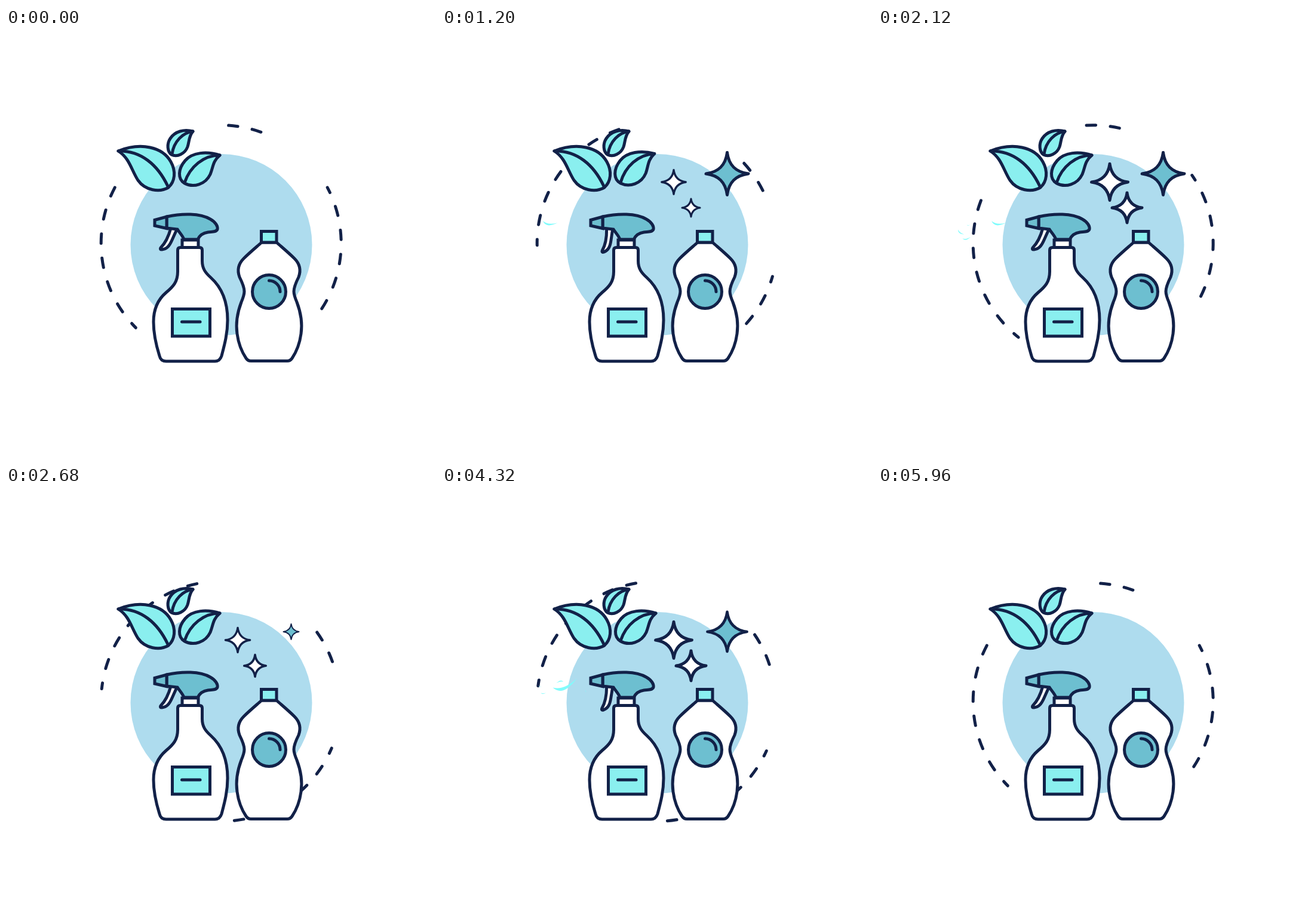
An HTML page with a canvas for the animation above (6 s loop, 720 by 720 pixels).

```html
<!DOCTYPE html>
<html lang="en">
<head>
<meta charset="utf-8">
<title>Eco cleaning</title>
<style>
html, body { margin: 0; width: 100%; height: 100%; overflow: hidden; background: #fff; }
canvas { display: block; }
</style>
</head>
<body>
<canvas id="stage" width="720" height="720"></canvas>
<script>
const ctx = document.getElementById('stage').getContext('2d');
const LOOP = 6000, STEP = 40, RAD = Math.PI / 180;
const NAVY = '#122148', TEAL = '#6dbfd0', AQUA = '#8aefef', SKY = '#aedcee', MIST = '#80fcfc';

const smooth = s => s * s * (3 - 2 * s);

// keys: [seconds, value] pairs, eased in and out between neighbours
function track(t, keys) {
  if (t <= keys[0][0]) return keys[0][1];
  for (let i = 1; i < keys.length; i++) {
    const [t0, a] = keys[i - 1], [t1, b] = keys[i];
    if (t < t1) return a + (b - a) * smooth((t - t0) / (t1 - t0));
  }
  return keys[keys.length - 1][1];
}

const bump = (t, from, to, v) => track(t, [[from, 0], [(from + to) / 2, v], [to, 0]]);

function shape(d, fill, stroke = true) {
  const p = typeof d === 'string' ? new Path2D(d) : d;
  if (fill) { ctx.fillStyle = fill; ctx.fill(p); }
  if (stroke) { ctx.strokeStyle = NAVY; ctx.lineWidth = 5; ctx.stroke(p); }
}

function turned(x, y, deg, draw) {
  ctx.save();
  ctx.translate(x, y);
  ctx.rotate(deg * RAD);
  ctx.translate(-x, -y);
  draw();
  ctx.restore();
}

function disc(x, y, r, fill, stroke) {
  const p = new Path2D();
  p.arc(x, y, r, 0, 7);
  shape(p, fill, stroke);
}

// ---- dashed ring ----
const RING = [[0, 0], [1, 50], [2, -10], [3, 70], [4, 40], [5, 90], [5.96, 0]];
const ARCS = [[-28.4, 33.7, 201], [134.6, 208.4, 201], [-87.4, -69.6, 197.8]];

function ring(t) {
  const turn = track(t, RING), cap = 0.7;
  for (const [from, to, r] of ARCS) {
    for (let a = to; a > from + 2; a -= 11.6) {
      const p = new Path2D();
      p.arc(360.2, 360.5, r, (Math.max(a - 5.9, from) + cap + turn) * RAD, (a - cap + turn) * RAD);
      shape(p);
    }
  }
}

// ---- leaves ----
function leaves(t) {
  turned(272, 265, bump(t, 3, 4, -4.8), () => {
    shape('M188 206C226 191 262 199 276 224C285 240 283 257 272 267C257 276 233 272 221 255C210 238 207 218 188 206Z', AQUA);
    shape('M188 206C226 205 254 229 271 265');
  });
  turned(300, 261, bump(t, 1, 2, -7.4), () => {
    shape('M358 213C336 206 312 208 300 222C288 236 287 253 299 260C314 268 334 262 342 245C347 233 346 223 358 213Z', AQUA);
    shape('M358 213C331 213 308 232 299 259');
  });
  turned(277, 211, bump(t, 4.5, 5.5, 8.6), () => {
    shape('M313 173C298 169 283 173 275 185C269 194 270 207 277 212C287 217 300 210 304 199C307 190 306 181 313 173Z', AQUA);
    shape('M313 173C296 175 281 190 278 211');
  });
}

// ---- bottles ----
const PULL = [[0.75, 0], [1.15, -16], [2, 0], [3.9, 0], [4.4, -16], [5, -16], [5.5, 0]];

function sprayer(t) {
  turned(281, 337, track(t, PULL), () =>
    shape('M276 335C272 350 267 360 259 368Q257 371 261 371C270 370 274 364 278 355L287 335Z', '#fff'));
  shape('M295 355H322V368H295Z', '#fff');
  shape('M269 316C295 310 325 310 342 320C351 325 355 332 354 337C352 342 345 341 338 342C330 343 324 348 321 354H298C296 348 290 342 287 337L269 335Z', TEAL);
  shape('M249 321.5L269 316V335.5L249 331Z', TEAL);
  shape('M287.5 372Q287.5 367.5 292 367.5H324Q328.500 367.500 328.500 372V390C328.500 403 334 410 343 418C364 437 371 462 371 489C371 512 366 530 361 549Q358 558 350 558H268Q259 558 257 549C251 530 247 512 247 492C247 470 254 455 268 443C280 433 287.500 425 287.500 408Z', '#fff');
  shape('M278.500 470.500H341.500V516H278.500Z', AQUA);
  shape('M294.500 492H325');
}

function bottle() {
  shape('M428 359C419 367 408 376 398 386C389 395 387 406 391 417C395 425 399 433 399 441C399 447 397 452 394 459C386 480 385 498 387 512C389 527 394 541 402 553Q405 557.500 410 557.500H471Q476 557.500 479 553C487 541 492 527 494 512C496 498 495 480 487 459C484 452 482 447 482 441C482 433 486 425 490 417C494 406 492 395 483 386C473 376 462 367 453 359Z', '#fff');
  shape('M427.500 340.500H453V359H427.500Z', AQUA);
  disc(440.5, 441.5, 28, TEAL, true);
  shape('M440.500 423A18.500 18.500 0 0 1 459 441.500');
}

// ---- sparkles ----
const STARS = [
  { x: 477.5, y: 244, r: 35.5, fill: TEAL, ends: [0, 1, 2.09, 3.09, 3.42, 4.1, 4.2, 4.95] },
  { x: 388, y: 258, r: 30.5, fill: '#fff', ends: [0.65, 1.55, 2.3, 3.3, 3.45, 4.35, 4.6, 5.6] },
  { x: 417, y: 301, r: 25, fill: '#fff', ends: [0.7, 1.58, 2.34, 3.34, 3.37, 4.3, 4.68, 5.68] }
];

function star(t, { x, y, r, fill, ends }) {
  const k = track(t, ends.map((s, i) => [s, i % 4 === 1 || i % 4 === 2 ? 1 : 0]));
  if (k < 0.01) return;
  ctx.save();
  ctx.translate(x, y);
  ctx.scale(k, k);
  const p = new Path2D(), a = r * 0.08, b = r * 0.4;
  p.moveTo(0, -r);
  p.bezierCurveTo(a, -b, b, -a, r, 0);
  p.bezierCurveTo(b, a, a, b, 0, r);
  p.bezierCurveTo(-a, b, -b, a, -r, 0);
  p.bezierCurveTo(-b, -a, -a, -b, 0, -r);
  shape(p, fill);
  ctx.restore();
}

// ---- mist: drops fly left from the nozzle, each repeating while the trigger works ----
const SPEED = 240, REACH = 121, NOZZLE = [246, 327];
const BURSTS = [
  { at: 1.6, from: 0.8, to: 2, drops: [[205, 327, 23, 28], [142, 342, 12, 60], [152, 352, 13, 10], [155, 330, 5, 20]] },
  { at: 4.96, from: 3.9, to: 4.82, drops: [[173, 337, 40, 0], [165, 328, 11, 190], [131, 337, 5, 40], [137, 351, 8, 20], [208, 371, 13, 80]] }
];

function mist(t) {
  ctx.fillStyle = MIST;
  for (const { at, from, to, drops } of BURSTS) {
    for (const [x, y, len, deg] of drops) {
      const u0 = NOZZLE[0] - x;
      const u = (((u0 + SPEED * (t - at)) % REACH) + REACH) % REACH;
      const born = t - u / SPEED;
      if (born < from || born > to) continue;
      const k = len / 40 * Math.min(1, u / 20);
      ctx.save();
      ctx.translate(NOZZLE[0] - u, NOZZLE[1] + (y - NOZZLE[1]) * Math.sqrt(u / u0));
      ctx.rotate(deg * RAD);
      ctx.scale(k, k);
      ctx.beginPath();
      ctx.moveTo(-20, 3);
      ctx.quadraticCurveTo(-3, 19, 20, -12);
      ctx.quadraticCurveTo(-2, 8, -20, 3);
      ctx.fill();
      ctx.restore();
    }
  }
}

function draw(t) {
  ctx.fillStyle = '#fff';
  ctx.fillRect(0, 0, 720, 720);
  ctx.lineCap = ctx.lineJoin = 'round';
  disc(360.5, 363, 152, SKY, false);
  ring(t);
  leaves(t);
  ctx.lineJoin = 'miter';
  sprayer(t);
  bottle();
  ctx.lineJoin = 'round';
  STARS.forEach(s => star(t, s));
  mist(t);
}

const start = performance.now();
function frame() {
  const ms = (performance.now() - start) % LOOP;
  draw(Math.floor(ms / STEP) * STEP / 1000);
  requestAnimationFrame(frame);
}
frame();
</script>
</body>
</html>
```
